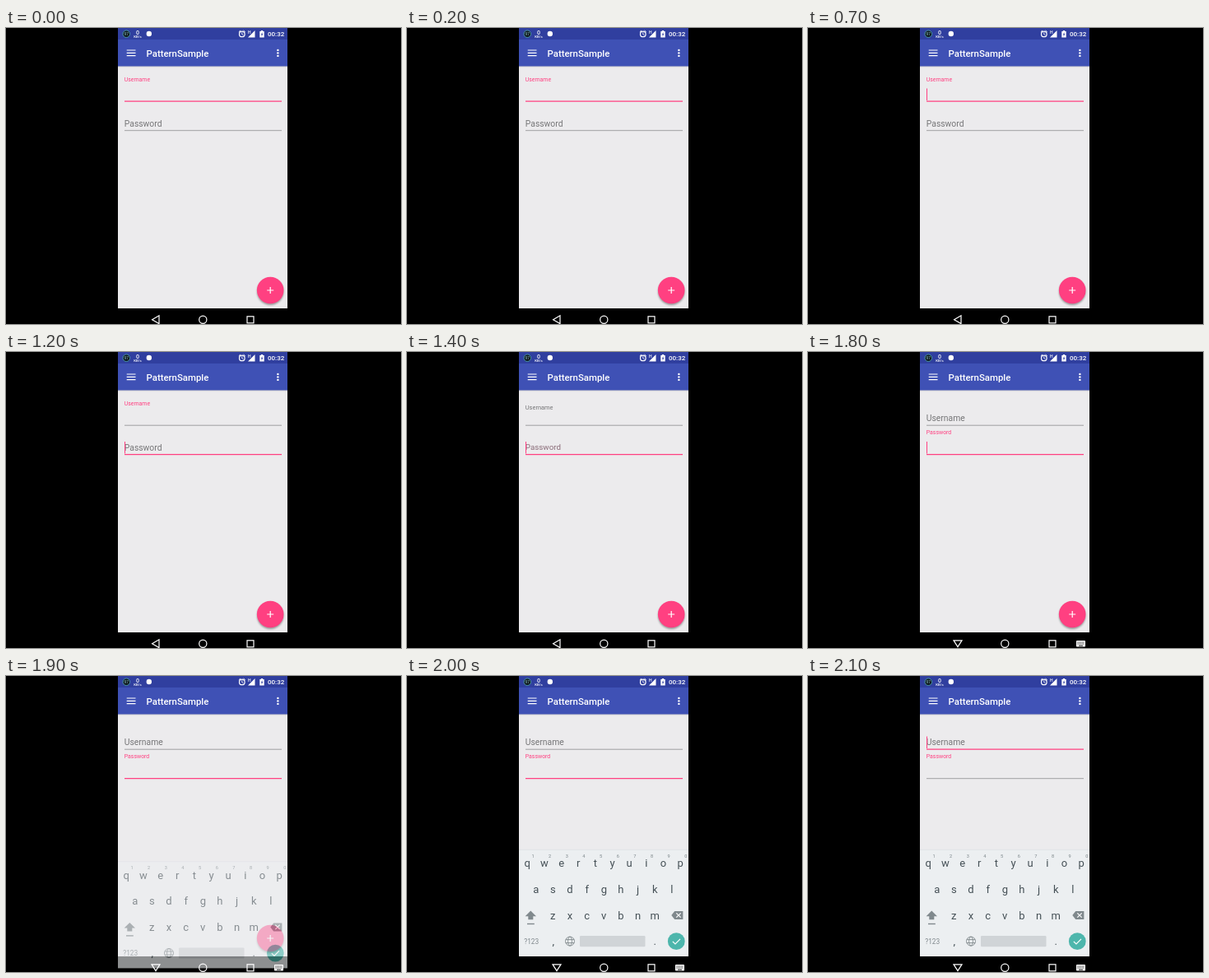
An HTML page for the animation above (2.2 s loop, 480 px wide and 360 px high).

```html
<!DOCTYPE html>
<html lang="en">
<head>
<meta charset="utf-8">
<title>Login form</title>
<style>
  html, body { margin: 0; width: 100%; height: 100%; overflow: hidden; background: #000; }
  svg { display: block; width: 480px; height: 360px; font-family: Roboto, sans-serif; }
  .line { fill: none; stroke: #fff; stroke-width: 1.2; }
  .mid { text-anchor: middle; }
  #keys { font-size: 13px; fill: #455056; }
  #keys .hint { font-size: 5.6px; fill: #7b8589; }
</style>
</head>
<body>
<svg viewBox="0 0 480 360">
  <defs>
    <filter id="blur" x="-30%" y="-30%" width="160%" height="160%"><feGaussianBlur stdDeviation="1.3"/></filter>
    <linearGradient id="fade" x2="0" y2="1"><stop stop-opacity=".16"/><stop offset="1" stop-opacity="0"/></linearGradient>
  </defs>
  <rect width="480" height="360"/>
  <rect x="136" width="206" height="341" fill="#ecebed"/>

  <!-- status bar and toolbar -->
  <rect x="136" y="46" width="206" height="2.5" fill="url(#fade)"/>
  <rect x="136" width="206" height="14.5" fill="#303f9f"/>
  <rect x="136" y="14" width="206" height="32.5" fill="#3f51b5"/>
  <g fill="#fff">
    <circle cx="146.3" cy="7.2" r="4.3" fill="#101820" stroke="#4b9fae" stroke-width=".9"/>
    <text class="mid" x="146.3" y="9" font-size="4.8" fill="#8fd0c8">97</text>
    <text class="mid" x="160" y="7.8" font-size="7" font-weight="500">0</text>
    <text class="mid" x="160" y="12.3" font-size="4.3" font-weight="500">KB/s</text>
    <circle cx="173.8" cy="7" r="3.2"/>
    <g class="line" stroke-width="1">
      <circle cx="286.8" cy="7.4" r="3.3"/>
      <path d="M286.8 5.3V7.6L288.3 8.6M282.8 4.9L285 3M290.8 4.9L288.6 3" stroke-width=".9"/>
    </g>
    <path d="M302.5 3V11.5H294Z"/>
    <text x="294" y="6.8" font-size="5" font-weight="500">H</text>
    <path d="M308.3 4H309.8V3H312.2V4H313.7V11.5H308.3Z"/>
    <path d="M311.7 5L309.7 8.2H310.9L310.4 10.5L312.4 7.3H311.2Z" fill="#303f9f"/>
    <text x="318" y="10.3" font-size="8" font-weight="500">00:32</text>
    <path class="line" d="M146.7 27H157.5M146.7 30.3H157.5M146.7 33.6H157.5"/>
    <text x="170.5" y="35" font-size="11.4" font-weight="500">PatternSample</text>
    <circle cx="330.4" cy="26.9" r="1.2"/><circle cx="330.4" cy="30.4" r="1.2"/><circle cx="330.4" cy="33.9" r="1.2"/>
  </g>

  <g id="fields"></g>

  <circle cx="321.2" cy="320.8" r="16.2" opacity=".35" filter="url(#blur)"/>
  <circle cx="321.2" cy="319" r="16.3" fill="#ff4081"/>
  <path class="line" d="M317.2 319H325.2M321.2 315V323"/>

  <rect x="136" y="341" width="206" height="19"/>
  <g id="keyboard">
    <rect x="136" y="211" width="206" height="130" fill="#eceff1"/>
    <path d="M136 211.3H342" stroke="#dcdfe2" stroke-width=".7"/>
    <g id="keys"></g>
    <g fill="#80898d">
      <path d="M150.3 285.5L157 292.2H153.3V296.2H147.3V292.2H143.6Z"/>
      <rect x="146" y="300.8" width="8.8" height="1.4"/>
      <path d="M321.3 291L325.2 286H335.4V296H325.2Z"/>
      <path class="line" d="M327.3 288.3L332.7 293.7M332.7 288.3L327.3 293.7"/>
      <text class="mid" x="151.2" y="325.8" font-size="8.3">?123</text>
      <g class="line" style="stroke:#80898d;stroke-width:.9">
        <circle cx="198" cy="322.6" r="5.5"/><ellipse cx="198" cy="322.6" rx="2.4" ry="5.5"/>
        <path d="M193 320.6H203M193 324.6H203"/>
      </g>
    </g>
    <rect x="210" y="316" width="79.5" height="13.2" rx="1.2" fill="#d0d4d7"/>
    <circle cx="327.3" cy="322.7" r="10.4" fill="#4db6ac"/>
    <path class="line" d="M322.8 322.8L326 326L332 319.8"/>
  </g>

  <!-- navigation bar -->
  <g class="line">
    <path id="back"/>
    <circle cx="239.3" cy="354.7" r="4.6"/>
    <rect x="293" y="350.8" width="8" height="8"/>
  </g>
  <g id="imeIcon">
    <rect x="326" y="351" width="11" height="7.6" rx=".8" fill="#fff"/>
    <path d="M327.3 353H336M327.3 355H336" stroke="#000" stroke-width="1" stroke-dasharray="1 .8"/>
    <path d="M329 357.2H334" stroke="#000" stroke-width=".9"/>
  </g>
</svg>
<script>
const LOOP = 2200, STEP = 100;
const PINK = [255, 64, 129], GRAY = [117, 117, 119];
const $ = id => document.getElementById(id);
const clamp = v => Math.max(0, Math.min(1, v));
const mix = (a, b, p) => a + (b - a) * p;
const rgb = (a, b, p) => `rgb(${a.map((v, i) => Math.round(mix(v, b[i], p)))})`;

function add(parent, tag, attrs, text = '') {
  const el = document.createElementNS('http://www.w3.org/2000/svg', tag);
  set(el, attrs);
  el.textContent = text;
  return parent.appendChild(el);
}
function set(el, attrs) {
  for (const name in attrs) el.setAttribute(name, attrs[name]);
}

// Fast-out, slow-in: cubic-bezier(.4, 0, .2, 1)
function ease(x) {
  let lo = 0, hi = 1;
  for (let i = 0; i < 20; i++) {
    const s = (lo + hi) / 2, r = 1 - s;
    if (1.2 * s * r * r + .6 * s * s * r + s ** 3 < x) lo = s; else hi = s;
  }
  return lo * lo * (3 - 2 * lo);
}

function makeField(name, lineY) {
  const root = $('fields');
  const label = add(root, 'text', { x: 143.8 }, name);
  const line = add(root, 'path', { d: `M144 ${lineY}H335` });
  const cursor = add(root, 'path', { d: `M144.5 ${lineY - 15.7}v14.5`, stroke: rgb(PINK, PINK, 0) });
  // raised: 0 = label inside the field, 1 = small label above it
  return ({ raised, labelColor, focused, blinkOn }) => {
    set(label, {
      y: mix(lineY - 5.1, lineY - 24.5, raised * raised),
      'font-size': mix(10.35, 6.9, raised),
      fill: rgb(GRAY, labelColor, raised)
    });
    set(line, { stroke: focused ? rgb(PINK, PINK, 0) : '#8b8b8d', 'stroke-width': focused ? 1.3 : .8 });
    set(cursor, { opacity: focused && blinkOn ? 1 : 0 });
  };
}

const username = makeField('Username', 89.2);
const password = makeField('Password', 124.7);

['qwertyuiop', 'asdfghjkl', 'zxcvbnm'].forEach((row, r) => {
  [...row].forEach((key, i) => {
    const x = [146.3, 156.7, 177.3][r] + 20.65 * i;
    add($('keys'), 'text', { class: 'mid', x, y: 232.3 + 31.6 * r }, key);
    if (r === 0) add($('keys'), 'text', { class: 'mid hint', x: x + 6.7, y: 221 }, (i + 1) % 10);
  });
});
add($('keys'), 'text', { class: 'mid', x: 177.7, y: 327 }, ',');
add($('keys'), 'text', { class: 'mid', x: 301.3, y: 327 }, '.');

function draw(now) {
  const t = Math.floor(now % LOOP / STEP) * STEP;
  const swap = ease(clamp((t - 1300) / 470));
  const onPassword = t >= 1200 && t < 2100;
  const blinkOn = t >= 700 && t < 1900 || t >= 2100;

  username({ raised: 1 - swap, labelColor: t < 1300 ? PINK : GRAY, focused: !onPassword, blinkOn });
  password({ raised: swap, labelColor: PINK, focused: onPassword, blinkOn });

  const shown = clamp((t - 1800) / 100 * .6);
  set($('keyboard'), { opacity: shown, transform: `translate(0 ${36 * (1 - shown)})` });

  const imeOpen = t >= 1800;
  set($('back'), { d: imeOpen ? 'M177 350.8H187L182 358.6Z' : 'M186 349.8V359.6L177.6 354.7Z' });
  set($('imeIcon'), { opacity: imeOpen ? 1 : 0 });
}

const start = performance.now();
function tick() {
  draw(performance.now() - start);
  requestAnimationFrame(tick);
}
tick();
</script>
</body>
</html>
```
